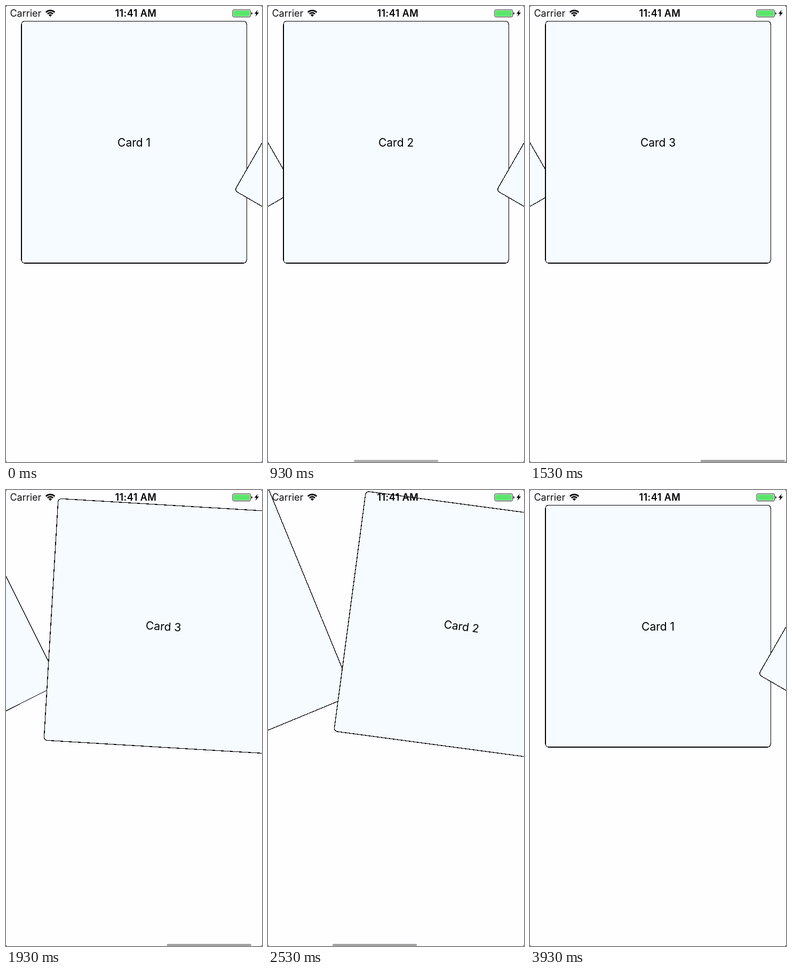
Animation of 480x853 px, one loop 4.87 s. Source, as an HTML page:

```html
<!DOCTYPE html>
<html lang="en">
<head>
<meta charset="utf-8">
<title>Card carousel</title>
<style>
  html, body { margin: 0; width: 100%; height: 100%; overflow: hidden; background: #fefdff; }
  svg { display: block; width: 100%; height: 100%; }
  text { font-family: Inter, Roboto, sans-serif; fill: #000; text-anchor: middle; }
  .card rect { fill: #f6fbff; stroke: #000; stroke-width: 1.3; shape-rendering: crispEdges; }
  .card text { font-size: 21px; }
  .status { font-size: 18px; }
  .status .carrier { text-anchor: start; fill: #111; }
  .status .time { font-weight: 600; letter-spacing: 0.45px; }
</style>
</head>
<body>
<svg viewBox="0 0 480 853">
  <g id="cards"></g>
  <rect id="bar" y="849" width="158.5" height="3.9" rx="1.95" opacity="0"/>
  <g class="status">
    <text class="carrier" x="7.4" y="20">Carrier</text>
    <g fill="none" stroke="#000" stroke-width="2.6">
      <path d="M74.8 11.8A11.6 11.6 0 0 1 91.2 11.8"/>
      <path d="M77.8 14.8A7.4 7.4 0 0 1 88.2 14.8"/>
    </g>
    <path d="M83 20L79.9 16.9A4.4 4.4 0 0 1 86.1 16.9Z"/>
    <text class="time" x="243.4" y="20">11:41 AM</text>
    <rect x="425" y="7" width="33.6" height="13.6" rx="2.6" fill="none" stroke="#222"/>
    <rect x="426.4" y="8.4" width="30.8" height="10.8" rx="1.4" fill="#5be56b"/>
    <path d="M460 11.4Q462 12 462 13.8T460 16.2Z"/>
    <path d="M472 7L465.8 14.4H469.4L467.6 20L474.2 12.2H470.4Z"/>
  </g>
  <path fill="#555" d="M0 0H2L0 2ZM480 0H478L480 2ZM0 853V851L2 853ZM480 853V851L478 853Z"/>
</svg>
<script>
  const LOOP = 4870, GAP = 484.5, TILT = 30, FADE = 200;

  // Each swipe: direction, midpoint, scroll bar shown from, scroll bar gone at (ms)
  const swipes = [
    { dir: 1, mid: 680, on: 520, off: 1100 },
    { dir: 1, mid: 1282.2, on: 1060, off: 1800 },
    { dir: -1, mid: 2000, on: 1860, off: 2490 },
    { dir: -1, mid: 2567.4, on: 2390, off: 3060 }
  ];

  const clamp = v => Math.min(1, Math.max(0, v));
  const flick = ms => clamp((1 / (1 + Math.exp(-ms / 33.8)) - 0.0015) / 0.997);

  const holder = document.getElementById('cards');
  const bar = document.getElementById('bar');
  holder.innerHTML = [1, 2, 3].map(n => `
    <g class="card">
      <rect x="-211.05" y="-226.4" width="422.1" height="452.8" rx="6"/>
      <text y="8">Card ${n}</text>
    </g>`).join('');
  const cards = [...holder.children];

  function draw(t) {
    let page = 0, shown = 0;
    for (const s of swipes) {
      page += s.dir * flick(t - s.mid);
      if (t >= s.on) shown = Math.max(shown, clamp((s.off - t) / FADE));
    }
    cards.forEach((card, i) => {
      const d = i - page;
      card.setAttribute('transform', `translate(${240.1 + d * GAP} 254.6) rotate(${d * TILT})`);
    });
    bar.setAttribute('x', 2.5 + 158.5 * page);
    bar.setAttribute('opacity', 0.36 * shown);
  }

  const start = performance.now();
  function tick() {
    draw((performance.now() - start) % LOOP);
    requestAnimationFrame(tick);
  }
  tick();
</script>
</body>
</html>
```
